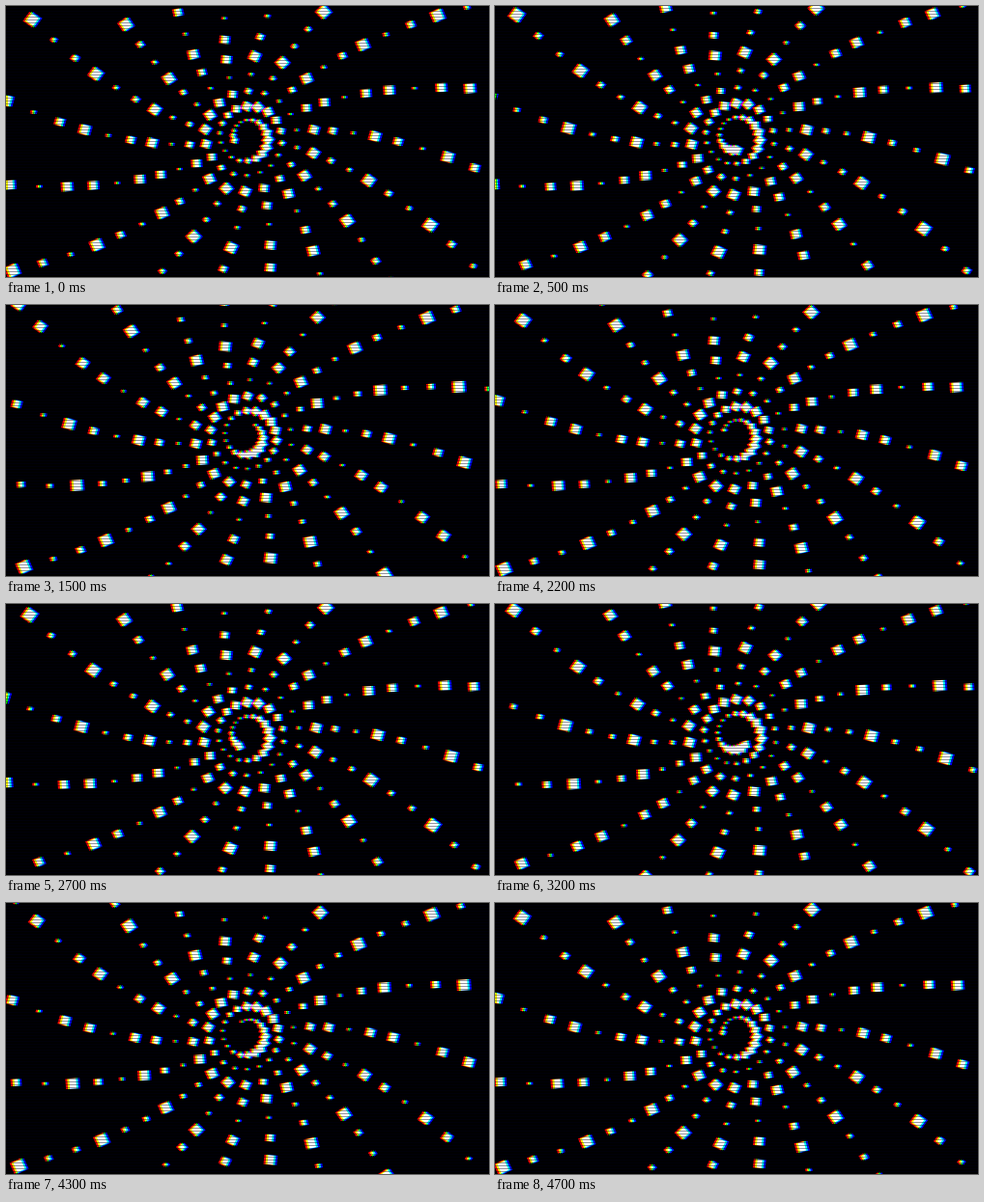
Animation of 500 by 281 pixels, one loop 4800 ms. Source, as an HTML page without scripts:

```html
<!DOCTYPE html>
<html lang="en">
<head>
<meta charset="utf-8">
<title>Spiral of squares</title>
<style>
html, body { margin: 0; height: 100%; overflow: hidden; background: #000; }
svg { position: absolute; width: 0; height: 0; }
#stage { position: absolute; left: 0; top: 0; width: 500px; height: 281px; overflow: hidden; background: #000; }
#dots { position: absolute; inset: 0; filter: url(#fringe); }
/* scan lines */
#stage::after {
  content: ""; position: absolute; inset: 0;
  background: repeating-linear-gradient(transparent 0 2px, rgba(0, 0, 24, .42) 2px 3px);
}

/* 18 arms; --f is the part of a 100 ms tick lost by rounding */
p {
  --f: 0; position: absolute; left: 250px; top: 136px; width: 0; height: 0; margin: 0;
  transform: rotate(calc(var(--a) * 20deg - 23.3deg)) translateX(calc(var(--f) * -.9px));
}
p:nth-child(3n+2) { --f: .33333; }
p:nth-child(3n) { --f: -.33333; }

i {
  position: absolute; left: 0; top: 0; width: 0; height: 0;
  animation: fly 28.8s steps(24) infinite;
  animation-delay: calc((var(--a) * 4 / 3 - var(--f) + var(--k) * 24 + .02) * -.1s);
}
i::before {
  content: ""; position: absolute; left: -5.75px; top: -5.75px; width: 11.5px; height: 11.5px;
  background: #fff; rotate: 39.3deg;
  animation: pulse 7.2s steps(6) infinite;
  animation-delay: calc((var(--a) * 16 / 3 - var(--f) + var(--k) * 96 + 16.02) * -.1s);
}
i:nth-child(1) { --k: 0; }
i:nth-child(2) { --k: 1; }
i:nth-child(3) { --k: 2; }
i:nth-child(4) { --k: 3; }
i:nth-child(5) { --k: 4; }
i:nth-child(6) { --k: 5; }
i:nth-child(7) { --k: 6; }
i:nth-child(8) { --k: 7; }
i:nth-child(9) { --k: 8; }
i:nth-child(10) { --k: 9; }
i:nth-child(11) { --k: 10; }
i:nth-child(12) { --k: 11; }

/* one ring outwards per 2.4 s, with a slight twist */
@keyframes fly {
  0%       { transform: rotate(10deg) translateX(-13.7px) rotate(-10deg) scale(.72); }
  8.3333%  { transform: rotate(12deg) translateX(-27.6px) rotate(-12deg) scale(.75); }
  16.6667% { transform: rotate(14deg) translateX(-43px) rotate(-14deg) scale(.78); }
  25%      { transform: rotate(16deg) translateX(-60px) rotate(-16deg) scale(.81); }
  33.3333% { transform: rotate(18deg) translateX(-78.5px) rotate(-18deg) scale(.84); }
  41.6667% { transform: rotate(20deg) translateX(-98.6px) rotate(-20deg) scale(.87); }
  50%      { transform: rotate(22deg) translateX(-120.5px) rotate(-22deg) scale(.9); }
  58.3333% { transform: rotate(24deg) translateX(-143.7px) rotate(-24deg) scale(.92); }
  66.6667% { transform: rotate(26deg) translateX(-168.3px) rotate(-26deg) scale(.94); }
  75%      { transform: rotate(28deg) translateX(-194.6px) rotate(-28deg) scale(.96); }
  83.3333% { transform: rotate(30deg) translateX(-222.5px) rotate(-30deg) scale(.98); }
  91.6667% { transform: rotate(32deg) translateX(-252px) rotate(-32deg) scale(1); }
  100%     { transform: rotate(34deg) translateX(-283px) rotate(-34deg) scale(1.02); }
}
/* cosine swell */
@keyframes pulse {
  0%, 100% { scale: 1; }
  8.3333%, 91.6667% { scale: .95; }
  16.6667%, 83.3333% { scale: .8125; }
  25%, 75% { scale: .625; }
  33.3333%, 66.6667% { scale: .4375; }
  41.6667%, 58.3333% { scale: .3; }
  50% { scale: .25; }
}
</style>
</head>
<body>
<svg aria-hidden="true">
  <filter id="fringe" filterUnits="userSpaceOnUse" x="0" y="0" width="500" height="281" color-interpolation-filters="sRGB">
    <feColorMatrix in="SourceGraphic" values="1 0 0 0 0  0 0 0 0 0  0 0 0 0 0  0 0 0 1 0"/>
    <feOffset dx="-2" result="red"/>
    <feColorMatrix in="SourceGraphic" values="0 0 0 0 0  0 1 0 0 0  0 0 0 0 0  0 0 0 1 0" result="green"/>
    <feColorMatrix in="SourceGraphic" values="0 0 0 0 0  0 0 0 0 0  0 0 1 0 0  0 0 0 1 0"/>
    <feOffset dx="2" result="blue"/>
    <feBlend in="red" in2="green" mode="screen"/>
    <feBlend in2="blue" mode="screen"/>
  </filter>
</svg>
<div id="stage"><div id="dots">
<p style="--a:0"><i></i><i></i><i></i><i></i><i></i><i></i><i></i><i></i><i></i><i></i><i></i><i></i></p>
<p style="--a:1"><i></i><i></i><i></i><i></i><i></i><i></i><i></i><i></i><i></i><i></i><i></i><i></i></p>
<p style="--a:2"><i></i><i></i><i></i><i></i><i></i><i></i><i></i><i></i><i></i><i></i><i></i><i></i></p>
<p style="--a:3"><i></i><i></i><i></i><i></i><i></i><i></i><i></i><i></i><i></i><i></i><i></i><i></i></p>
<p style="--a:4"><i></i><i></i><i></i><i></i><i></i><i></i><i></i><i></i><i></i><i></i><i></i><i></i></p>
<p style="--a:5"><i></i><i></i><i></i><i></i><i></i><i></i><i></i><i></i><i></i><i></i><i></i><i></i></p>
<p style="--a:6"><i></i><i></i><i></i><i></i><i></i><i></i><i></i><i></i><i></i><i></i><i></i><i></i></p>
<p style="--a:7"><i></i><i></i><i></i><i></i><i></i><i></i><i></i><i></i><i></i><i></i><i></i><i></i></p>
<p style="--a:8"><i></i><i></i><i></i><i></i><i></i><i></i><i></i><i></i><i></i><i></i><i></i><i></i></p>
<p style="--a:9"><i></i><i></i><i></i><i></i><i></i><i></i><i></i><i></i><i></i><i></i><i></i><i></i></p>
<p style="--a:10"><i></i><i></i><i></i><i></i><i></i><i></i><i></i><i></i><i></i><i></i><i></i><i></i></p>
<p style="--a:11"><i></i><i></i><i></i><i></i><i></i><i></i><i></i><i></i><i></i><i></i><i></i><i></i></p>
<p style="--a:12"><i></i><i></i><i></i><i></i><i></i><i></i><i></i><i></i><i></i><i></i><i></i><i></i></p>
<p style="--a:13"><i></i><i></i><i></i><i></i><i></i><i></i><i></i><i></i><i></i><i></i><i></i><i></i></p>
<p style="--a:14"><i></i><i></i><i></i><i></i><i></i><i></i><i></i><i></i><i></i><i></i><i></i><i></i></p>
<p style="--a:15"><i></i><i></i><i></i><i></i><i></i><i></i><i></i><i></i><i></i><i></i><i></i><i></i></p>
<p style="--a:16"><i></i><i></i><i></i><i></i><i></i><i></i><i></i><i></i><i></i><i></i><i></i><i></i></p>
<p style="--a:17"><i></i><i></i><i></i><i></i><i></i><i></i><i></i><i></i><i></i><i></i><i></i><i></i></p>
</div></div>
</body>
</html>
```
